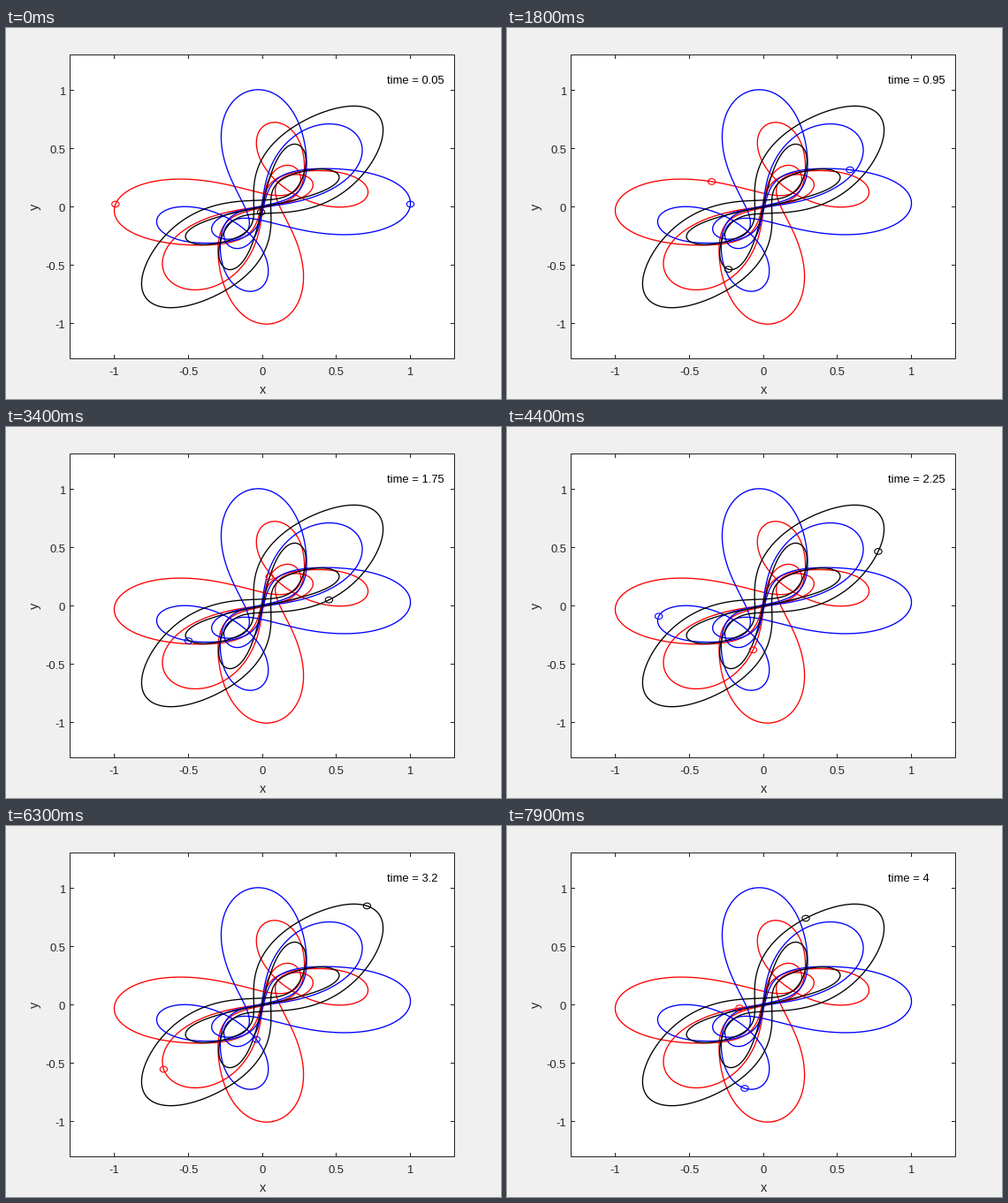
These frames come from a looping animation (560x420 px, 8000 ms). A matplotlib script:

```python
import numpy as np
import matplotlib.pyplot as plt
from matplotlib.animation import FuncAnimation
from matplotlib.patches import Ellipse, Rectangle

W, H = 560, 420
FRAMES, STEP = 80, 0.05
COLORS = ("red", "blue", "black")
INK = "#262626"
PX = 0.72  # points per pixel at 100 dpi

# --- three equal masses, centre of mass at rest; positions are complex ---


def pull(w):
    d = np.abs(w)
    return w / (d * d * d)


def rate(s):
    r, b, vr, vb = s
    rb = pull(b - r)
    return np.array([vr, vb, rb - pull(2 * r + b), -rb - pull(2 * b + r)])


def trace(p, end, n):
    """RK4 from the collinear start (-1, 1, 0) with outer velocities p."""
    h = end / n
    one = np.ones_like(p)
    s = np.array([-one, one, p, p])
    path = [s]
    for _ in range(n):
        k1 = rate(s)
        k2 = rate(s + h / 2 * k1)
        k3 = rate(s + h / 2 * k2)
        k4 = rate(s + h * k3)
        s = s + h / 6 * (k1 + 2 * k2 + 2 * k3 + k4)
        path.append(s)
    return np.array(path)


# Waypoints of the two outer bodies that pick the orbit family
WAY_T = np.array([0.95, 1.75, 2.25, 2.7, 3.2, 4.0])
WAY = np.array([
    [-0.351 + 0.216j, 0.587 + 0.315j],
    [0.054 + 0.246j, -0.500 - 0.300j],
    [-0.072 - 0.376j, -0.710 - 0.088j],
    [-0.369 - 0.700j, -0.446 - 0.008j],
    [-0.668 - 0.551j, -0.042 - 0.297j],
    [-0.162 - 0.031j, -0.126 - 0.715j],
])


def search(p, span, count, n=800):
    side = np.linspace(-span, span, count)
    grid = (p + side[:, None] + 1j * side[None, :]).ravel()
    rows = np.rint(WAY_T / 4 * n).astype(int)
    path = trace(grid, 4.0, n)[rows, :2]
    gap = np.fmin(np.abs(path - WAY[:, :, None]), 0.3)
    return grid[(gap ** 2).sum(axis=(0, 1)).argmin()]


def miss(px, py, end):
    """Zero when the bodies line up and all move square to that line."""
    r, b, vr, vb = trace(px + 1j * py, end, 1000)[-1]
    k = -(r + b)
    return np.array([(r.conj() * b).imag, (k.conj() * vr).real, (k.conj() * vb).real])


def close_orbit(guess, eps=1e-6):
    x = guess.copy()
    for _ in range(6):
        f = miss(*(x[:, None] + np.hstack([np.zeros((3, 1)), eps * np.eye(3)])))
        step = np.linalg.solve((f[:, 1:] - f[:, :1]) / eps, f[:, 0])
        x -= np.clip(step, -0.02, 0.02)
    return x if np.abs(x - guess).max() < 0.06 else guess


def solve_orbit():
    p = 0.08 + 0.45j
    for span, count in ((0.075, 31), (0.0075, 15), (0.0015, 15)):
        p = search(p, span, count)
    px, py, quarter = close_orbit(np.array([p.real, p.imag, 3.034]))

    path = trace(np.array([px + 1j * py]), quarter, 1000)[:, :2, 0]
    r, b = path.T
    bodies = np.array([r, b, -(r + b)])
    # mirror in the line of bodies, then rotate half a turn with time reversed
    axis = bodies[2, -1] / abs(bodies[2, -1])
    mirrored = axis ** 2 * bodies.conj()[:, ::-1]
    half = np.hstack([bodies, mirrored[:, 1:]])
    past = -half[[1, 0, 2], ::-1]
    t = np.linspace(-2 * quarter, 2 * quarter, 2 * half.shape[1] - 1)
    return t, np.hstack([past, half[:, 1:]])


UX, UY = 167.1, 132.3  # pixels per data unit


def sx(x):
    return 290 + UX * x


def sy(y):
    return 202.5 - UY * y


times, orbits = solve_orbit()

plt.rcParams["font.family"] = "Liberation Sans"
fig = plt.figure(figsize=(W / 100, H / 100), dpi=100, facecolor="#f0f0f0")
ax = fig.add_axes([0, 0, 1, 1])
ax.set(xlim=(0, W), ylim=(H, 0))
ax.axis("off")


def label(x, y, s, size=13, color=INK, **kw):
    return ax.text(x, y, s, fontsize=size * PX, color=color, **kw)


# whole numbers, so that snapping puts each thin line on that pixel
L, R, T, B = 72, 507, 30, 374
ax.add_patch(Rectangle((L, T), R - L, B - T, fc="white", ec="none", zorder=0))
ax.add_patch(Rectangle((L, T), R - L, B - T, fc="none", ec=INK, lw=PX, zorder=1))

for v in (-1, -0.5, 0, 0.5, 1):
    x, y = int(sx(v)), int(sy(v))
    for x0, y0, x1, y1 in ((x, T, x, T + 4), (x, B, x, B - 4),
                           (L, y, L + 4, y), (R, y, R - 4, y)):
        ax.plot([x0, x1], [y0, y1], color=INK, lw=PX, zorder=1)
    label(x, 393, f"{v:g}", ha="center")
    label(67, y + 6, f"{v:g}", ha="right")

label(290, 413.5, "x", 14.5, ha="center")
label(33, 202, "y", 14.5, ha="center", va="center", rotation=90)
clock = label(431, 63, "", color="black")

rings = []
for z, color in zip(orbits, COLORS):
    ax.plot(sx(z.real), sy(z.imag), color=color, lw=1.33 * PX, zorder=2)
    ring = Ellipse((0, 0), 0.05 * UX, 0.05 * UY, fc="none", ec=color,
                   lw=1.1 * PX, zorder=3)
    rings.append(ax.add_patch(ring))


def update(i):
    t = STEP * (i + 1)
    clock.set_text(f"time = {t:g}")
    for ring, z in zip(rings, orbits):
        p = np.interp(t, times, z)
        ring.set_center((sx(p.real), sy(p.imag)))
    return [clock, *rings]


anim = FuncAnimation(fig, update, frames=FRAMES, init_func=lambda: update(0),
                     interval=100, repeat=True, repeat_delay=0)
plt.show()
```
